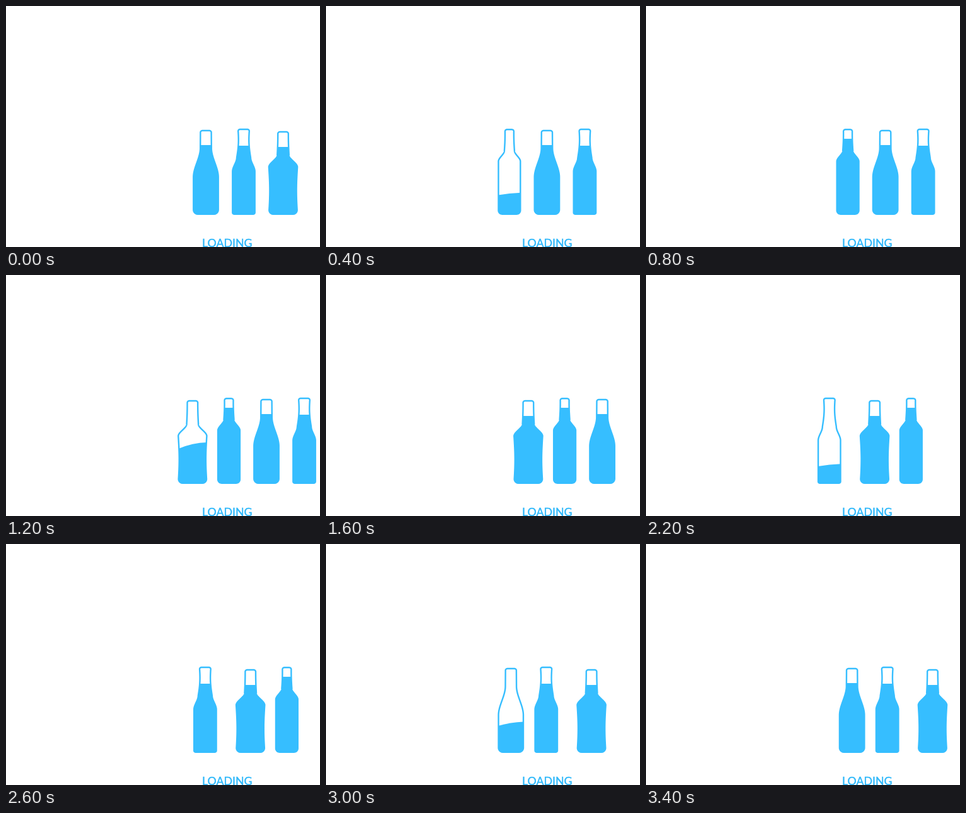
Recreate the animation shown at these times as an HTML page with a canvas. Size 498 by 383 pixels, loop 3500 ms.

```html
<!DOCTYPE html>
<html lang="en">
<head>
<meta charset="utf-8">
<title>Loading</title>
<style>
  html, body { margin: 0; width: 498px; height: 383px; overflow: hidden; background: #fff; }
  canvas { display: block; }
  p { position: absolute; left: 311px; top: 367px; height: 16px; overflow: hidden; margin: 0;
      font: 17.8px/18px Lato, sans-serif; color: #2cb7fa; -webkit-text-stroke: .4px; }
</style>
</head>
<body>
<canvas id="stage" width="498" height="383"></canvas>
<p>LOADING</p>
<script>
const LOOP = 3500, STEP = 100, SPEED = 0.0835, BASE = 330.8, BLUE = '#36beff';
const ctx = document.getElementById('stage').getContext('2d');
const clamp = (v, lo, hi) => Math.min(hi, Math.max(lo, v));

// lip, neck and body are half widths; the shoulder runs between the heights from and to
const burgundy = { top: 198, lip: 8.6, neck: 8.8, pinch: 0, from: 226, to: 272, body: 19.7, waist: 0, foot: 7, level: 221, exit: 468 };
const beer = { top: 196, lip: 9, neck: 11, pinch: 1.6, from: 241, to: 263, body: 17.7, waist: 0, foot: 2.5, level: 222, exit: 486 };
const whiskey = { top: 200, lip: 8.3, neck: 9.3, pinch: 0.3, from: 237, to: 256, body: 22.6, waist: 1.5, foot: 7, level: 224, exit: 468 };
const bordeaux = { top: 196.3, lip: 7, neck: 8, pinch: 0.4, from: 230, to: 247, body: 17.4, waist: 0, foot: 6, level: 211, exit: 468 };

// Bottles and their distance from the one that starts at the left
const row = [[burgundy, -245], [beer, -189], [whiskey, -117.2], [bordeaux, -59.5],
             [burgundy, 0], [beer, 60], [whiskey, 122.5]];

// The row moves evenly, apart from these pauses: [start, length]
const pauses = [[500, 50], [1400, 100], [1700, 100], [2500, 100]];

function rowAt(t) {
  const paused = pauses.reduce((sum, [start, length]) => sum + clamp(t - start, 0, length), 0);
  return 317 + SPEED * (t - paused);
}

// How far a round corner of radius r cuts in at distance d from the edge
const corner = (d, r) => d < r ? r - Math.sqrt(r * r - (r - d) ** 2) : 0;

function halfWidth(b, y) {
  const u = clamp((y - b.top) / (b.from - b.top), 0, 1);
  const s = clamp((y - b.from) / (b.to - b.from), 0, 1);
  const v = clamp((y - b.to) / (BASE - b.to), 0, 1);
  const neck = b.lip + (b.neck - b.lip) * u - b.pinch * Math.sin(Math.PI * u);
  return neck + (b.body - neck) * s * s * (3 - 2 * s) - b.waist * Math.sin(Math.PI * v)
    - corner(y - b.top, 3) - corner(BASE - y, b.foot);
}

function outline(b) {
  const path = new Path2D(), rows = 400;
  const yAt = i => b.top + (BASE - b.top) * i / rows;
  for (let i = 0; i <= rows; i++) path.lineTo(halfWidth(b, yAt(i)), yAt(i));
  for (let i = rows; i >= 0; i--) path.lineTo(-halfWidth(b, yAt(i)), yAt(i));
  path.closePath();
  return path;
}
for (const b of [burgundy, beer, whiskey, bordeaux]) b.path = outline(b);

function drawBottle({ path, level }, x) {
  const filled = clamp((x - 286.3) / 17, 0, 1);
  const y = 332 - (332 - level) * filled;
  const tilt = filled < 1 ? 10 * filled : 0;
  ctx.save();
  ctx.translate(x, 0);
  ctx.stroke(path);
  ctx.clip(path);
  ctx.beginPath();
  ctx.moveTo(-25, y + tilt);
  ctx.quadraticCurveTo(0, y - tilt, 25, y - tilt);
  ctx.lineTo(25, 340);
  ctx.lineTo(-25, 340);
  ctx.fill();
  ctx.restore();
}

function draw(now) {
  const lead = rowAt(Math.floor(now % LOOP / STEP) * STEP);
  ctx.clearRect(0, 0, 498, 383);
  ctx.fillStyle = ctx.strokeStyle = BLUE;
  ctx.lineWidth = 2.4;
  for (const [bottle, place] of row) {
    const x = lead + place;
    if (x > 272.5 && x < bottle.exit) drawBottle(bottle, x);
  }
}

const start = performance.now();
function tick() {
  draw(performance.now() - start);
  requestAnimationFrame(tick);
}
tick();
</script>
</body>
</html>
```
